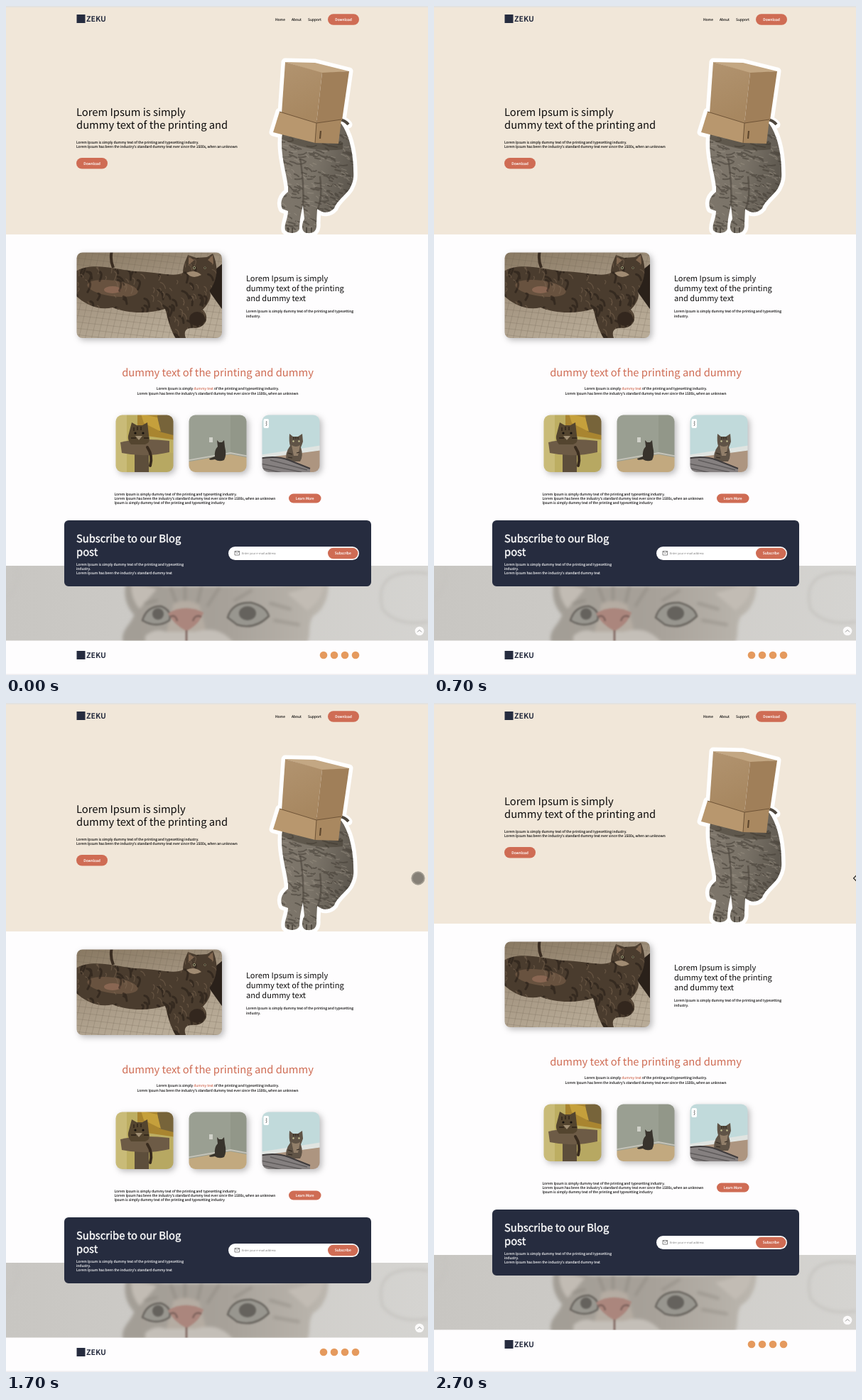
An HTML page that plays this animation: 594 by 943 pixels, repeating every 2.8 s.

```html
<!DOCTYPE html>
<html lang="en">
<head>
<meta charset="utf-8">
<title>Landing page</title>
<style>
html, body { margin: 0; width: 100%; height: 100%; overflow: hidden; background: #fefdfe; }
svg { display: block; width: 594px; height: 943px; }
text { font-family: "Noto Sans CJK KR", "Noto Sans CJK JP", "Noto Sans CJK SC", "Noto Sans", sans-serif; font-weight: 500; fill: #0d0c0c; text-rendering: geometricPrecision; white-space: pre; }
.h1 { font-size: 14.75px; }
.h2 { font-size: 11.07px; }
.p { font-size: 4.95px; stroke: #0d0c0c; stroke-width: .1; }
.btn { font-size: 4.95px; fill: #fff; stroke: #fff; stroke-width: .15; text-anchor: middle; }
.mid { text-anchor: middle; }
.white { fill: #fff; stroke: #fff; }
.h1.white { stroke-width: .4; }
.rust { fill: #cf6c54; stroke: #cf6c54; }
.h1.rust { stroke: none; }
.hint { font-size: 4px; fill: #777; }
.logo { font-size: 10.5px; font-weight: 900; fill: #262c3f; }
.pill { fill: #cf6c54; }
.shadow { filter: drop-shadow(3px 3px 4px #0004); }
.soft { filter: blur(.6px); }
.hazy { filter: blur(2px); }
.fur { fill: none; stroke-linecap: round; }
</style>
</head>
<body>
<svg viewBox="0 0 594 943">
  <defs>
    <clipPath id="heroClip"><rect y="-20" width="594" height="342"/></clipPath>
    <clipPath id="wideClip"><rect x="99.5" y="347.5" width="204.5" height="120.5" rx="8"/></clipPath>
    <clipPath id="card1"><rect x="154.5" y="576.5" width="81" height="80.5" rx="9"/></clipPath>
    <clipPath id="card2"><rect x="257.5" y="576.5" width="81" height="80.5" rx="9"/></clipPath>
    <clipPath id="card3"><rect x="360.5" y="576.5" width="81" height="80.5" rx="9"/></clipPath>
    <clipPath id="bandClip"><rect y="789" width="594" height="105.5"/></clipPath>
    <path id="cat" d="M389 180C385 205 394 232 397 255V262C389 268 385 276 389 286L397 289C397 300 391 308 393 316C398 322 411 321 413 314C413 302 416 290 418 280L420 300C415 310 416 319 424 320C434 321 438 316 437 306L438 286C446 293 456 292 462 285C466 274 477 268 484 257C491 244 489 238 489 228C488 202 482 180 472 166L440 160Z"/>
    <clipPath id="catClip"><use href="#cat"/></clipPath>
    <path id="box" d="M393 79L435 80L483 92L473 161L468 194L435 193L376 178L385 149L388 150Z"/>
    <path id="tail" d="M470 160Q477 161 482 167"/>
    <path id="lying" d="M98 374C120 361 150 370 180 374C208 374 238 383 249 376C249 364 254 357 256 351L268 355L283 354L291 349C298 364 300 384 286 402C291 408 285 420 277 428C287 438 282 453 266 454C252 452 249 460 254 470H240C230 455 228 440 224 427C200 434 172 434 150 425C130 430 110 420 98 408Z"/>
    <clipPath id="lyingClip"><use href="#lying"/></clipPath>
    <linearGradient id="coat" x2="1" y2=".3">
      <stop stop-color="#7f776c"/><stop offset=".55" stop-color="#7a7368"/><stop offset="1" stop-color="#5f5950"/>
    </linearGradient>
    <linearGradient id="card" x2=".3" y2="1">
      <stop stop-color="#b29470"/><stop offset="1" stop-color="#a78760"/>
    </linearGradient>
    <linearGradient id="sheet" x2=".4" y2="1">
      <stop stop-color="#86765f"/><stop offset=".5" stop-color="#a39480"/><stop offset="1" stop-color="#b8ab97"/>
    </linearGradient>
    <linearGradient id="band">
      <stop stop-color="#c8c6c2"/><stop offset=".6" stop-color="#cfcdc9"/><stop offset="1" stop-color="#d5d4d1"/>
    </linearGradient>
    <linearGradient id="face" x2="1">
      <stop stop-color="#a39e96"/><stop offset=".5" stop-color="#a7a199"/><stop offset="1" stop-color="#bcb7af"/>
    </linearGradient>
  </defs>
  <rect width="594" height="943" fill="#fefdfe"/>

  <g id="page">
    <g clip-path="url(#heroClip)">
      <rect y="-20" width="594" height="342" fill="#f1e7d9"/>
      <g fill="#fff" stroke="#fff" stroke-width="11" stroke-linejoin="round" stroke-linecap="round">
        <use href="#cat"/><use href="#box"/><use href="#tail"/>
      </g>
      <use href="#tail" fill="none" stroke="#4e473e" stroke-width="4"/>
      <use href="#cat" fill="url(#coat)"/>
      <g clip-path="url(#catClip)"><g class="soft">
        <path id="catFur" class="fur" stroke="#403a33" stroke-width="2" opacity=".5"/>
        <path id="catLight" class="fur" stroke="#a39a8d" stroke-width="1.2" opacity=".45"/>
        <path d="M385 176L436 193L474 192V202Q430 208 385 186Z" fill="#3c352c" opacity=".45"/>
        <path d="M414 215Q420 250 418 285M438 288Q446 270 442 240" fill="none" stroke="#4b453c" stroke-width="2.5" opacity=".6"/>
        <path d="M397 319v-7M403 321v-8M423 320v-8M430 320v-8" stroke="#3c362f" stroke-width="1.3"/>
      </g></g>
      <path d="M393 79L435 80L483 92L445 95Z" fill="#c3a783"/>
      <path d="M393 79L445 94L437 165L388 151Z" fill="url(#card)"/>
      <path d="M445 94L483 92L473 161L437 165Z" fill="#a07f59"/>
      <path d="M385 149L437 165L435 193L376 178Z" fill="#b8976e"/>
      <path d="M437 165L472 160L468 194L435 193Z" fill="#a98860"/>
      <path d="M385 149L437 165L472 160M437 165L435 193" fill="none" stroke="#6f5437" stroke-width="1"/>
      <path d="M443 176l-1 11" stroke="#5f482f" stroke-width="2.2"/>
    </g>
    <text class="h1" x="99" y="154.5">Lorem Ipsum is simply</text>
    <text class="h1" x="99" y="173">dummy text of the printing and</text>
    <text class="p" x="99" y="193.6">Lorem Ipsum is simply dummy text of the printing and typesetting industry.</text>
    <text class="p" x="99" y="200.3">Lorem Ipsum has been the industry's standard dummy text ever since the 1500s, when an unknown</text>
    <rect class="pill" x="99" y="214" width="44" height="15.5" rx="7.75"/>
    <text class="btn" x="121" y="223.5">Download</text>

    <g class="shadow"><g clip-path="url(#wideClip)"><g class="soft">
      <rect x="95" y="343" width="214" height="130" fill="url(#sheet)"/>
      <path id="plaid" fill="none" stroke="#6d604f" stroke-width=".7" opacity=".35"/>
      <path d="M149 345q-3 12 2 24" fill="none" stroke="#3a2d22" stroke-width="4"/>
      <path d="M294 372L306 362V430L286 402Z" fill="#2a211a"/>
      <use href="#lying" fill="#4a3c2e"/>
      <g clip-path="url(#lyingClip)">
        <ellipse cx="150" cy="398" rx="36" ry="11" fill="#755c47" opacity=".7" transform="rotate(8 150 398)"/>
        <ellipse cx="150" cy="400" rx="12" ry="5" fill="#97705a" opacity=".7"/>
        <path id="lyingFur" class="fur" stroke="#211913" stroke-width="3" opacity=".5"/>
        <path id="lyingLight" class="fur" stroke="#85705a" stroke-width="1.2" opacity=".45"/>
        <path d="M257 354L265 358L257 365ZM291 351L284 358L292 364Z" fill="#80664f"/>
        <path d="M254 376Q262 386 275 379Q266 371 254 376Z" fill="#a08b72"/>
      </g>
      <circle cx="265" cy="369" r="2" fill="#a5a27c"/><circle cx="280" cy="369" r="1.6" fill="#a5a27c"/>
      <circle cx="265" cy="369" r="1" fill="#17130f"/><circle cx="280" cy="369" r=".9" fill="#17130f"/>
      <ellipse cx="269" cy="441" rx="11" ry="10" fill="#33271e"/>
    </g></g></g>
    <text class="h2" x="338" y="387.7">Lorem Ipsum is simply</text>
    <text class="h2" x="338" y="401.6">dummy text of the printing</text>
    <text class="h2" x="338" y="415.5">and dummy text</text>
    <text class="p" x="338" y="432.3">Lorem Ipsum is simply dummy text of the printing and typesetting</text>
    <text class="p" x="338" y="438.7">industry.</text>

    <text class="h1 rust mid" x="298" y="521.5">dummy text of the printing and dummy</text>
    <text class="p mid" x="298" y="541.2">Lorem Ipsum is simply <tspan class="rust">dummy text</tspan> of the printing and typesetting industry.</text>
    <text class="p mid" x="298" y="547.8">Lorem Ipsum has been the industry's standard dummy text ever since the 1500s, when an unknown</text>

    <g class="shadow"><g clip-path="url(#card1)"><g class="soft">
      <rect x="150" y="572" width="90" height="90" fill="#bdae62"/>
      <path d="M150 572H170V662H150Z" fill="#c9bb78"/>
      <path d="M185 572H240V612L185 604Z" fill="#a98530"/>
      <path d="M213 577L240 574V606L216 600Z" fill="#77643a"/>
      <path d="M190 575L213 580L218 600L194 588Z" fill="#c5a03c"/>
      <path d="M200 630H240V662H200Z" fill="#b7a862"/>
      <path d="M181 628H201V662H181Z" fill="#5d4e3b"/>
      <path d="M161 615Q190 608 230 613V629Q195 637 163 630Z" fill="#6d5b46"/>
      <path d="M172 606L177 587L184 591H192L199 587L201 605Q204 616 196 618H176Q171 612 172 606Z" fill="#54452f"/>
      <path d="M199 622Q207 634 203 648" fill="none" stroke="#382b1e" stroke-width="4" stroke-linecap="round"/>
      <path d="M180 594v5M185 593v5M190 593v5M176 609h7M194 609h7" stroke="#2b2117" stroke-width="1.3"/>
      <path d="M182 606h10l-5 6z" fill="#a08e73"/>
      <circle cx="182" cy="602" r="1.6" fill="#15110d"/><circle cx="193" cy="602" r="1.6" fill="#15110d"/>
    </g></g></g>

    <g class="shadow"><g clip-path="url(#card2)"><g class="soft">
      <rect x="253" y="572" width="90" height="90" fill="#9a9f92"/>
      <path d="M316 572H343V637L316 629Z" fill="#929789"/>
      <path d="M253 643L316 632L343 637V662H253Z" fill="#c2a97f"/>
      <path d="M253 641L316 630L343 635" fill="none" stroke="#c6c4ba" stroke-width="1.8"/>
      <rect x="286" y="608" width="5" height="7" fill="#d0d1c9"/>
      <path d="M297 612L300 615H304L307 612L308 621Q311 633 307 640Q300 643 294 639Q286 641 286 638L294 635Q293 626 298 621Z" fill="#38332c"/>
    </g></g></g>

    <g class="shadow"><g clip-path="url(#card3)"><g class="soft">
      <rect x="356" y="572" width="90" height="90" fill="#c1dadb"/>
      <path d="M356 633L446 619V626L356 640Z" fill="#e0e4e1"/>
      <path d="M356 638L446 626V662H356Z" fill="#ad9580"/>
      <rect x="362.5" y="582" width="7.5" height="13" rx="2" fill="#fff"/>
      <path d="M366 585q2 1 0 3q2 1 0 4" fill="none" stroke="#555" stroke-width=".8"/>
      <path d="M399 603L404 607H411L417 603L418 614Q416 620 415 622Q419 634 414 642H395Q392 630 400 620Q398 614 399 603Z" fill="#5f5346"/>
      <path d="M402 619Q408 623 414 619L411 634H405Z" fill="#917e69"/>
      <path d="M405 607v4M408 607v4M411 607v4M397 630l6 2M397 636l6 1M413 629l-4 1" stroke="#302820" stroke-width="1.2"/>
      <circle cx="404.5" cy="613.5" r="1.2" fill="#c5c294"/><circle cx="412.5" cy="613.5" r="1.2" fill="#c5c294"/>
      <path d="M356 638Q380 633 398 640L428 652V662H356Z" fill="#858080"/>
      <path d="M356 638Q380 633 398 640L428 652" fill="none" stroke="#3f3b3c" stroke-width="2"/>
      <path d="M358 645l58 12M358 651l40 9M372 640l52 14" stroke="#5f5b5b" stroke-width="1.6"/>
    </g></g></g>

    <text class="p" x="152.5" y="689.6">Lorem Ipsum is simply dummy text of the printing and typesetting industry.</text>
    <text class="p" x="152.5" y="695.8">Lorem Ipsum has been the industry's standard dummy text ever since the 1500s, when an unknown</text>
    <text class="p" x="152.5" y="702.2">Ipsum is simply dummy text of the printing and typesetting industry</text>
    <rect class="pill" x="398" y="687.5" width="45.5" height="13" rx="6.5"/>
    <text class="btn" x="420.7" y="695.7">Learn More</text>

    <g clip-path="url(#bandClip)">
      <rect y="789" width="594" height="106" fill="url(#band)"/>
      <g class="hazy">
        <path d="M0 835Q22 815 14 789M594 800Q515 790 530 850Q550 875 594 868" fill="none" stroke="#c6c4c0" stroke-width="3"/>
        <path d="M165 897C160 880 178 870 180 858C164 840 166 818 171 810Q190 808 222 818H365Q415 818 452 798C458 825 450 850 432 860C424 875 430 885 424 897Z" fill="url(#face)"/>
        <path d="M176 816Q195 815 212 822L188 850Q176 836 176 816ZM396 828Q425 822 447 806Q450 835 424 852Z" fill="#c2bcb4"/>
        <path d="M232 820L240 842M252 818V840M275 818L270 840M300 820L284 845M345 824L322 838M196 842L212 838M372 842L400 850M378 866L412 872" stroke="#87827a" stroke-width="4" stroke-linecap="round" opacity=".45"/>
        <path d="M236 842Q255 834 272 844L286 897H222Z" fill="#b5aca2"/>
        <path d="M225 882Q210 876 196 888V897H320Q300 872 266 882Z" fill="#c4bfb8"/>
      </g>
      <g style="filter: blur(1px)">
        <g fill="#98968f" stroke="#6a6660" stroke-width="2.5">
          <path d="M192 866Q198 846 218 846Q234 852 230 866Q212 878 192 866Z"/>
          <path d="M312 862Q318 840 345 841Q366 846 370 860Q350 880 325 872Z"/>
        </g>
        <circle cx="214" cy="857" r="8" fill="#65625d"/>
        <ellipse cx="340" cy="856" rx="12" ry="10" fill="#65625d"/>
        <path d="M228 856Q252 842 278 855Q272 872 254 881Q236 872 228 856Z" fill="#ab867d"/>
        <path d="M231 861q8-4 10 6M275 861q-9-4-12 6M254 880V897" fill="none" stroke="#7d625c" stroke-width="2.5"/>
      </g>
    </g>
    <rect x="82" y="725" width="432" height="93" rx="6" fill="#262c3f"/>
    <text class="h1 white" x="99" y="756">Subscribe to our Blog</text>
    <text class="h1 white" x="99" y="774.5">post</text>
    <text class="p white" x="99" y="788.8">Lorem Ipsum is simply dummy text of the printing and typesetting</text>
    <text class="p white" x="99" y="795">industry.</text>
    <text class="p white" x="99" y="801.3">Lorem Ipsum has been the industry's standard dummy text</text>
    <rect x="313" y="762" width="184" height="19" rx="9.5" fill="#fff"/>
    <path d="M322 768.5h6.5v5.5H322zl3.25 3l3.25-3" fill="none" stroke="#555" stroke-width=".7"/>
    <text class="hint" x="332" y="773">Enter your e-mail address</text>
    <rect class="pill" x="453" y="763.7" width="42.5" height="15.6" rx="7.8"/>
    <text class="btn" x="474.2" y="773.3">Subscribe</text>

    <circle cx="582" cy="881" r="6.3" fill="#fbfafa"/>
    <path d="M579 882.5l3-3l3 3" fill="none" stroke="#8a8a8a" stroke-width=".9"/>
    <rect x="99.5" y="909" width="12" height="12" fill="#262c3f"/>
    <text class="logo" x="113" y="918.9">ZEKU</text>
    <g fill="#e59a5e">
      <circle cx="447" cy="915" r="5.3"/><circle cx="462" cy="915" r="5.3"/>
      <circle cx="477" cy="915" r="5.3"/><circle cx="492" cy="915" r="5.3"/>
    </g>
  </g>

  <rect width="594" height="36" fill="#f1e7d9"/>
  <rect width="594" height="1.8" fill="#e3e2e1"/>
  <rect y="941.5" width="594" height="1.5" fill="#efeeef"/>
  <rect x="99.5" y="12" width="12" height="12" fill="#262c3f"/>
  <text class="logo" x="113" y="21.9">ZEKU</text>
  <text class="p" x="379" y="21">Home</text>
  <text class="p" x="402" y="21">About</text>
  <text class="p" x="425" y="21">Support</text>
  <rect class="pill" x="453" y="11.3" width="44" height="15.5" rx="7.75"/>
  <text class="btn" x="475" y="20.8">Download</text>

  <circle id="touch" cx="580" cy="247" r="8.8" fill="#857f76" stroke="#a19b90" stroke-width="1.8" opacity="0"/>
  <path id="arrow" d="M594.5 243L590.5 247L594.5 251" fill="none" stroke="#222" stroke-width="1.1" opacity="0"/>
</svg>
<script>
const LOOP = 2800;
const $ = id => document.getElementById(id);

let seed = 7;
const rand = () => (seed = seed * 16807 % 2147483647) / 2147483647;

// Short, nearly parallel strokes scattered over a box.
function fur(id, count, x, y, w, h, len, angle) {
  let d = '';
  for (let i = 0; i < count; i++) {
    const a = angle + (rand() - .5) * .9, l = len * (.5 + rand());
    d += `M${(x + rand() * w).toFixed(1)} ${(y + rand() * h).toFixed(1)}` +
         `q${(l * .5).toFixed(1)} 1 ${(Math.cos(a) * l).toFixed(1)} ${(Math.sin(a) * l).toFixed(1)}`;
  }
  $(id).setAttribute('d', d);
}
fur('catFur', 190, 380, 180, 110, 140, 8, .2);
fur('catLight', 170, 380, 180, 110, 140, 6, .4);
fur('lyingFur', 80, 98, 350, 195, 115, 11, 1.25);
fur('lyingLight', 110, 98, 350, 195, 115, 8, 1.25);

let lines = '';
for (let i = 0; i < 30; i++) {
  lines += `M${60 + i * 9} 345l-30 125M97 ${310 + i * 9}l210 24`;
}
$('plaid').setAttribute('d', lines);

// Each step is [time in ms, value] and holds until the next one.
function play(id, prop, steps) {
  const frames = steps.map(([t, v]) => ({ offset: t / LOOP, [prop]: v, easing: 'steps(1, end)' }));
  frames.push({ offset: 1, [prop]: steps[steps.length - 1][1] });
  $(id).animate(frames, { duration: LOOP, iterations: Infinity }).startTime = 0;
}
const up = y => `translateY(${-y}px)`;
play('page', 'transform', [[0, up(0)], [1900, up(9.2)], [2000, up(10)], [2100, up(10.6)], [2200, up(11)]]);
play('touch', 'opacity', [[0, 0], [1500, 1], [2700, 0]]);
play('arrow', 'opacity', [[0, 0], [2700, 1]]);
</script>
</body>
</html>
```
